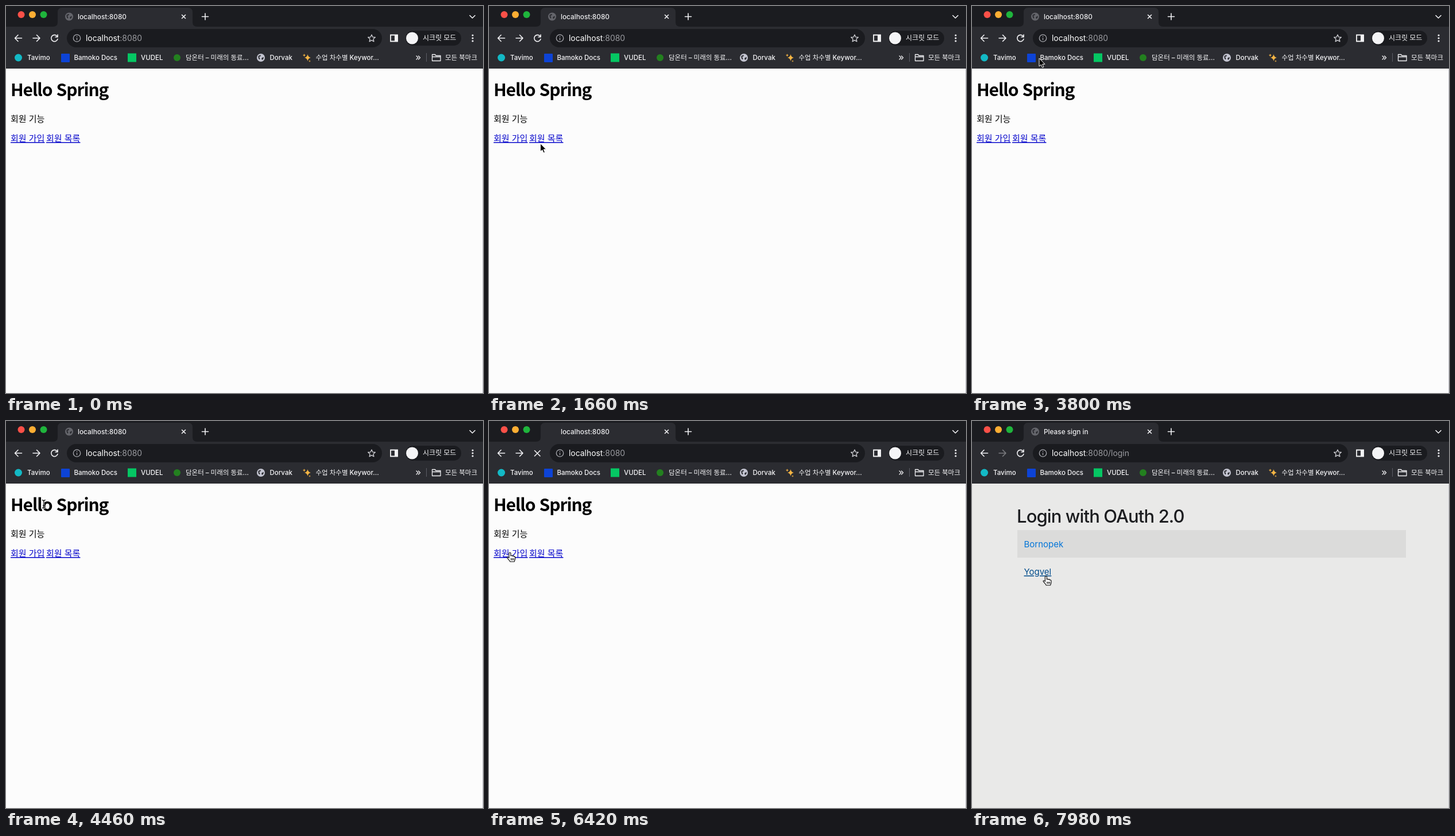
An HTML page that plays this animation: 831 px wide and 674 px high, repeating every 8 s.

```html
<!DOCTYPE html>
<html lang="ko">
<head>
<meta charset="utf-8">
<title>Hello Spring</title>
<style>
  html, body { margin: 0; width: 100%; height: 100%; overflow: hidden; background: #fcfcfc; }
  svg { display: block; width: 831px; height: 674px; }
  text { font-family: Inter, "Noto Sans CJK KR", "Noto Sans CJK", sans-serif; white-space: pre; }
  .bar { font-size: 11.5px; font-weight: 500; fill: #f6f6f8; }
  .tab { font-size: 11.8px; font-weight: 500; fill: #eeeef0; }
  .url { font-size: 13.9px; fill: #fff; }
  .url .dim { fill: #9a9ba0; }
  .line { fill: none; stroke: #f0f0f3; stroke-width: 1.6; stroke-linecap: round; stroke-linejoin: round; }
  .home text { font-family: "Noto Sans CJK KR", "Noto Sans CJK", sans-serif; font-size: 15px; fill: #000; }
  .home .title { font-size: 30px; font-weight: 700; letter-spacing: -1.1px; }
  .home .link { fill: #0808cc; text-decoration: underline; }
  .login text { font-size: 15px; fill: #0275d8; }
  .login .title { font-size: 31px; font-weight: 500; letter-spacing: -.9px; fill: #1c1d20; }
  .login .hover { fill: #014c8c; text-decoration: underline; }
</style>
</head>
<body>
<svg viewBox="0 0 831 674">
  <defs>
    <g id="globe">
      <circle r="7"/>
      <path d="M-4.500-3Q-2-5 0-4.500L-.5-2.500-3-1.500-1.500 1.500-2.500 3.500Q-5 1-4.500-3ZM2 0 5 -1Q5 2 2.500 4L1 2Z" fill="#2b2c31"/>
    </g>
  </defs>

  <!-- pages -->
  <g class="home" id="home">
    <rect y="108" width="831" height="566" fill="#fcfcfc"/>
    <text class="title" x="8" y="157">Hello Spring</text>
    <text x="8" y="202">회원 기능</text>
    <text class="link" x="8" y="236">회원 가입</text>
    <text class="link" x="70" y="236">회원 목록</text>
  </g>
  <g class="login" id="login">
    <rect y="108" width="831" height="566" fill="#e9e9e8"/>
    <rect x="79" y="190" width="677" height="48" fill="#dbdbda"/>
    <text class="title" x="78" y="176.500">Login with OAuth 2.0</text>
    <text id="first" x="90.500" y="220">Bornopek</text>
    <text id="second" x="90.500" y="268">Yogvel</text>
  </g>
  <path d="M830.500 108V674" stroke="#cacad0"/>

  <!-- tab strip -->
  <rect width="831" height="37" fill="#1b1c20"/>
  <rect y="36" width="831" height="73" fill="#2b2c31"/>
  <path d="M82 36Q90 36 90 28V11Q90 3 98 3H317Q325 3 325 11V28Q325 36 333 36Z" fill="#2b2c31"/>
  <circle cx="26.500" cy="15" r="6" fill="#fb5048"/>
  <circle cx="46" cy="15" r="6" fill="#fdae33"/>
  <circle cx="65.500" cy="15" r="6" fill="#1fb53c"/>
  <use id="favicon" href="#globe" x="110" y="18.500" fill="#64656b"/>
  <text class="tab" id="tabTitle" x="125" y="22.700"></text>
  <path class="line" d="M306.500 15.500l6 6m0-6l-6 6M341.500 18.500h11m-5.500-5.500v11M808 16.500l4.500 4.500 4.500-4.500"/>

  <!-- toolbar -->
  <path class="line" d="M27.500 56H15.500m5.500-5.500L15.500 56l5.500 5.500"/>
  <path class="line" id="forward" d="M47 56H59m-5.500-5.500L59 56l-5.500 5.500"/>
  <path class="line" id="reload" d="M89.300 53A5.700 5.700 0 1 0 90 57.500M90 50v4h-4"/>
  <path class="line" id="stop" d="M79.500 51.500l9.500 9.500m0-9.500l-9.500 9.500"/>
  <rect x="106" y="40" width="549" height="32" rx="16" fill="#1a1b1f"/>
  <g stroke="#a9aab0" fill="none" stroke-width="1.300">
    <circle cx="123.500" cy="56" r="6.200"/>
    <path d="M123.500 55.500v3.700m0-6.700v1.400"/>
  </g>
  <text class="url" x="139" y="60.700">localhost<tspan class="dim" id="path"></tspan></text>
  <path d="M637 50l1.800 4.100 4.500.4-3.400 3 1 4.400-3.900-2.300-3.900 2.300 1-4.400-3.400-3 4.500-.4Z" fill="none" stroke="#d0d0d5" stroke-width="1.300" stroke-linejoin="round"/>
  <path d="M670 50.500h12v11h-12Z" fill="none" stroke="#f4f4f6" stroke-width="1.800"/>
  <path d="M677 50h5.500v12H677Z" fill="#f4f4f6"/>
  <rect x="696" y="43" width="97" height="26" rx="13" fill="#1a1b1f"/>
  <circle cx="707.500" cy="56" r="10.500" fill="#f4f4f6"/>
  <text class="bar" x="726" y="60.300" style="font-size:12px">시크릿 모드</text>
  <g fill="#f0f0f3">
    <circle cx="813" cy="51" r="1.600"/><circle cx="813" cy="56" r="1.600"/><circle cx="813" cy="61" r="1.600"/>
  </g>

  <!-- bookmarks -->
  <circle cx="21.500" cy="90" r="6.500" fill="#13b9c5"/>
  <rect x="96" y="83" width="15" height="15" rx="1" fill="#0d43d6"/>
  <rect x="212" y="82.500" width="15" height="15" fill="#05c763"/>
  <circle cx="298" cy="90" r="6" fill="#23801f"/>
  <use href="#globe" x="444" y="90" fill="#c3c4d0"/>
  <path d="M525.500 84q.8 5.200 5.500 6-4.700.8-5.500 6-.8-5.200-5.500-6 4.700-.8 5.500-6ZM519.500 83l.7 2 2 .7-2 .7-.7 2-.7-2-2-.7 2-.7ZM529 94l.5 1.500 1.500.5-1.500.5-.5 1.500-.5-1.500-1.500-.5 1.500-.5Z" fill="#f5b544"/>
  <g class="bar">
    <text x="37" y="94">Tavimo</text>
    <text x="118.500" y="94">Bamoko Docs</text>
    <text x="235" y="94">VUDEL</text>
    <text x="313" y="94">담온터 – 미래의 동료...</text>
    <text x="459.500" y="94">Dorvak</text>
    <text x="539.500" y="94">수업 차수별 Keywor...</text>
    <text x="765" y="94">모든 북마크</text>
  </g>
  <path class="line" d="M715 87l3 3-3 3m3.500-6l3 3-3 3" style="stroke-width:1.400"/>
  <path d="M732.500 82v15" stroke="#5c5d66"/>
  <path class="line" d="M742.500 95.500v-11h5l1.500 2h8v9ZM742.500 88.500h14.500" style="stroke-width:1.300"/>

  <!-- pointer shapes, hot spot at 0,0 -->
  <g id="pointer">
    <path id="arrow" d="M0 0V14L3.300 11.200 5.600 16.200 7.900 15.200 5.700 10.300H10Z" fill="#000" stroke="#fff"/>
    <g id="beam" fill="none">
      <path d="M-3-7Q0-7 0-4.500 0-7 3-7M0-5V5M-3 7Q0 7 0 4.500 0 7 3 7M-1.500 2.500h3" stroke="#fff" stroke-width="2.600"/>
      <path d="M-3-7Q0-7 0-4.500 0-7 3-7M0-5V5M-3 7Q0 7 0 4.500 0 7 3 7M-1.500 2.500h3" stroke="#000" stroke-width="1.200"/>
    </g>
    <g id="hand" fill="#fff" stroke="#000" stroke-width="1.100" stroke-linejoin="round">
      <path d="M-1.600 9.500V1.400C-1.600-.4 1.400-.4 1.400 1.400V6C1.600 5 4 5 4.200 6.400 4.600 5.400 6.600 5.700 6.800 7.200 7.400 6.400 9 6.800 9 8.300V11C9 13 8 13.600 7.700 16H.2C-.6 13.500-3 11.800-4.600 9.600-5.600 8-3.600 7.200-1.600 9.500Z"/>
      <path d="M2 10v3.500m2.200-3.500v3.500m2.200-3.500v3.500"/>
    </g>
  </g>
</svg>
<script>
  const LOOP = 8000, ENTER = 680, CLICK = 6300, LOADED = 6440;
  const el = id => document.getElementById(id);
  const show = (id, on) => el(id).style.display = on ? "" : "none";

  // time, x, y of the pointer
  const route = [
    [680, 300, 672], [1420, 104, 262], [1660, 89.5, 239.5], [2260, 70, 262],
    [2700, 40, 212], [3200, 90, 150], [3800, 117, 91], [4040, 117, 91],
    [4780, 32, 180], [5060, 28, 192], [5620, 37, 228], [6440, 36.5, 229],
    [6560, 38.5, 234], [6980, 38.5, 234], [7180, 66, 318], [7400, 104, 286],
    [7700, 126, 271], [8000, 129, 270]
  ];

  function pointerAt(t) {
    const i = Math.max(1, route.findIndex(p => p[0] > t));
    const [t0, x0, y0] = route[i - 1], [t1, x1, y1] = route[i];
    const u = Math.min(1, Math.max(0, (t - t0) / (t1 - t0)));
    const k = u * u * (3 - 2 * u);
    return [x0 + (x1 - x0) * k, y0 + (y1 - y0) * k];
  }

  function draw(t) {
    const login = t >= LOADED, loading = t >= CLICK && !login;
    show("home", !login);
    show("login", login);
    show("favicon", !loading);
    show("reload", !loading);
    show("stop", loading);
    el("forward").style.opacity = login ? .4 : 1;
    el("tabTitle").textContent = login ? "Please sign in" : "localhost:8080";
    el("path").textContent = login ? ":8080/login" : ":8080";

    const [x, y] = pointerAt(t);
    const inside = (left, top, right, bottom) => x >= left && x <= right && y >= top && y <= bottom;
    const first = login && inside(90, 205, 160, 225);
    const second = login && inside(90, 253, 141, 273);
    const hand = first || second || !login && inside(8, 222, 129, 238);
    const beam = !login && (inside(8, 186, 66, 206) || inside(8, 130, 178, 165))
      || login && inside(79, 150, 370, 182);
    el("first").classList.toggle("hover", first);
    el("second").classList.toggle("hover", second);
    show("pointer", t >= ENTER);
    show("hand", hand);
    show("beam", beam);
    show("arrow", !hand && !beam);
    el("pointer").setAttribute("transform", `translate(${x} ${y})`);
  }

  function tick() {
    draw(performance.now() % LOOP);
    requestAnimationFrame(tick);
  }
  tick();
</script>
</body>
</html>
```
